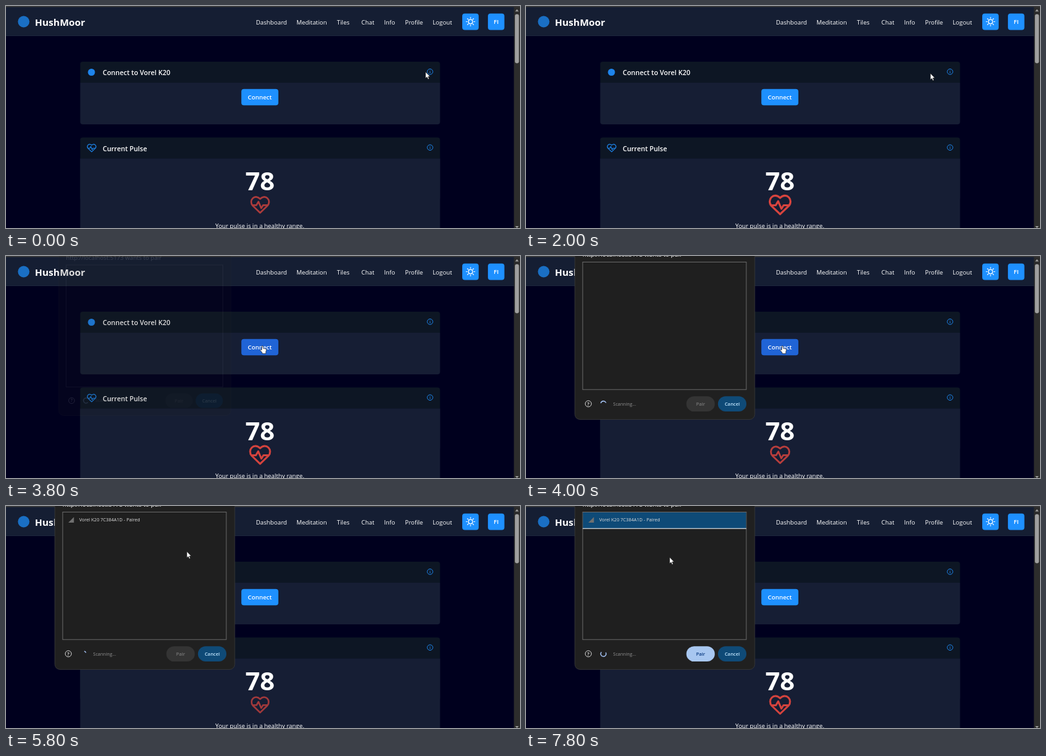
These frames come from a looping animation (800 px wide and 347 px high, 8 s). An HTML page:

```html
<!DOCTYPE html>
<html lang="en">
<head>
<meta charset="utf-8">
<title>Pulse dashboard</title>
<style>
  html, body { margin: 0; width: 100%; height: 100%; overflow: hidden; background: #00001e; }
  svg { display: block; width: 100%; height: 100%; }
  text { font-family: "Open Sans", "Noto Sans", sans-serif; fill: #fff; white-space: pre; }
  .nav { font-size: 9.4px; }
  .title { font-size: 10.5px; font-weight: 600; }
  .button { font-size: 9.4px; font-weight: 600; text-anchor: middle; }
  .small { font-size: 7.1px; }
  .pill { font-size: 7.4px; font-weight: 600; text-anchor: middle; }
  .line { fill: none; stroke: #1e84ea; }
</style>
</head>
<body>
<svg viewBox="0 0 800 347" preserveAspectRatio="none">
  <defs>
    <g id="heart" fill="none" stroke-width="1.8" stroke-linejoin="round" stroke-linecap="round">
      <path d="M0 9L-8 1.3C-12.6-4-6-12 0-6C6-12 12.6-4 8 1.3Z"/>
      <path d="M-8 .8H-4L-1.8-3L1.2 4L3.2 .8H8"/>
    </g>
    <g id="info" class="line">
      <circle r="4.3"/>
      <path d="M0-.5V2.3M0-2.3V-1.4"/>
    </g>
    <g id="card">
      <path fill="#161e34" d="M0 33H560V94a4 4 0 0 1-4 4H4a4 4 0 0 1-4-4Z"/>
      <path fill="#0d1624" d="M0 33V4a4 4 0 0 1 4-4H556a4 4 0 0 1 4 4V33Z"/>
    </g>
  </defs>

  <rect width="800" height="347" fill="#00001e"/>
  <rect width="791" height="46.5" fill="#151e33"/>
  <path stroke="#1c263b" d="M0 46.5H791"/>
  <circle cx="27.5" cy="24.5" r="9" fill="#1a6fc4"/>
  <text x="45" y="30.5" font-size="15" font-weight="700">HushMoor</text>
  <g id="menu"></g>
  <g fill="#1e90ff">
    <rect x="710.1" y="11.8" width="25.6" height="25.6" rx="4"/>
    <rect x="750.1" y="11.8" width="25.6" height="25.6" rx="4"/>
  </g>
  <g transform="translate(723 24.5)" fill="none" stroke="#fff" stroke-width="1.2">
    <circle r="3.3"/>
    <path id="rays" stroke-linecap="round"/>
  </g>
  <text class="button" x="763" y="28">FI</text>

  <use href="#card" x="115.5" y="87"/>
  <circle cx="133" cy="103.5" r="5.5" fill="#1e84ea"/>
  <text class="title" x="150.5" y="108">Connect to Vorel K20</text>
  <use href="#info" x="660" y="102.7"/>
  <rect id="connect" x="366.3" y="129.7" width="57.6" height="25.5" rx="4"/>
  <text class="button" x="395" y="146.3">Connect</text>

  <use href="#card" x="115.5" y="205.5"/>
  <rect x="115.5" y="238.5" width="560" height="109" fill="#161e34"/>
  <use href="#heart" stroke="#1e84ea" transform="translate(133.3 221.7) scale(.69)"/>
  <text class="title" x="150.5" y="226.5">Current Pulse</text>
  <use href="#info" x="660" y="221.2"/>
  <text x="395.3" y="288.3" font-size="40" font-weight="700" text-anchor="middle">78</text>
  <use id="pulse" href="#heart" stroke="#d8443e"/>
  <text class="nav" x="395" y="347" text-anchor="middle">Your pulse is in a healthy range.</text>

  <g id="tooltip">
    <rect x="505" y="116" width="160" height="30.5" rx="4" fill="#1b2630"/>
    <text class="small" x="510" y="129">Click "Connect", select your device, press</text>
    <text class="small" x="510" y="139">"Pair" and wait while it connects.</text>
  </g>

  <rect x="790.5" width="9.5" height="347" fill="#2c2c2c"/>
  <rect x="792.1" y="12.7" width="6.3" height="76.8" rx="3" fill="#9f9f9f"/>
  <path fill="#9f9f9f" d="M792.5 8.5L795.3 5L798 8.5ZM792.5 344L795.3 347L798 344Z"/>
  <rect width="800" height="1.6" fill="#3b3b3b"/>

  <g id="dialog">
    <rect x="76" y="-20" width="280" height="275.5" rx="8" fill="#202020" stroke="#3a3a3a" stroke-width=".8"/>
    <text x="88" y="1" font-size="9.7" fill="#e3e3e3">http://localhost:5173 wants to pair</text>
    <rect x="88.2" y="9.5" width="254.7" height="199.3" fill="#1f1f1f" stroke="#707070" stroke-width=".9"/>
    <g id="device">
      <g id="selection">
        <rect x="88.7" y="10" width="253.8" height="25" fill="#0e4a77"/>
        <rect x="88.2" y="34.7" width="254.7" height="1" fill="#fff"/>
      </g>
      <path fill="#707070" d="M97 26H105.7V17.3Z"/>
      <text class="small" x="114" y="24.3" style="fill:#dcdcdc">Vorel K20 7C384A1D - Paired</text>
    </g>
    <circle cx="97" cy="231" r="4.8" fill="none" stroke="#d0d0d0"/>
    <text class="pill" x="97" y="233.6">?</text>
    <path id="spinner" fill="none" stroke="#a8c7fa" stroke-width="1.4" stroke-linecap="round"/>
    <text class="small" x="135.5" y="233.5" style="fill:#8f8f8f">Scanning...</text>
    <rect id="pairBox" x="249.6" y="219.2" width="44.2" height="23.9" rx="11.95"/>
    <text id="pairLabel" class="pill" x="271.7" y="233.8">Pair</text>
    <rect x="298.8" y="219.2" width="44.2" height="23.9" rx="11.95" fill="#0f4a77"/>
    <text class="pill" x="321" y="233.8" style="fill:#c2e7ff">Cancel</text>
  </g>

  <g id="cursor" fill="#fff" stroke="#111" stroke-width=".6" stroke-linejoin="round">
    <path id="arrow" d="M0 0V10L2.3 7.9L3.9 11.5L5.5 10.8L4 7.3H7Z"/>
    <path id="hand" d="M-1 .9Q0-.6 1 .9V4.2L5.4 5.2Q6.4 5.6 6.2 7L5.3 10.2V12.6H-.2V11L-3.3 7.4Q-3.6 6-2.4 6.1L-1 7.2Z"/>
  </g>
</svg>
<script>
const LOOP = 8000, STEP = 200;
const el = id => document.getElementById(id);
const show = (id, on) => el(id).setAttribute('visibility', on ? 'inherit' : 'hidden');
const set = (id, name, value) => el(id).setAttribute(name, value);

const menu = { Dashboard: 389, Meditation: 452, Tiles: 515, Chat: 553, Info: 588.5, Profile: 621, Logout: 664 };
el('menu').innerHTML = Object.entries(menu)
  .map(([label, x]) => `<text class="nav" x="${x}" y="28.5">${label}</text>`).join('');

const polar = (angle, r) => [Math.cos(angle) * r, Math.sin(angle) * r];
set('rays', 'd', Array.from({ length: 8 }, (_, i) =>
  `M${polar(i * Math.PI / 4, 5.3)}L${polar(i * Math.PI / 4, 6.7)}`).join(''));

// time, x, y of the pointer tip
const track = [
  [0, 653, 103], [200, 653, 103], [400, 658.5, 99], [1800, 658.5, 99], [2600, 542, 124],
  [3400, 399, 140], [5200, 399, 140], [6200, 203, 25], [6800, 203, 25], [LOOP - STEP, 223.5, 80]
];

function pointerAt(t) {
  const i = Math.max(1, track.findIndex(key => key[0] >= t));
  const [t0, x0, y0] = track[i - 1], [t1, x1, y1] = track[i];
  const p = (t - t0) / (t1 - t0);
  return [x0 + (x1 - x0) * p, y0 + (y1 - y0) * p];
}

// The arc grows at its head, then shrinks from its tail, while it turns.
function spinnerPath(t) {
  const elapsed = t - 6800, sweepTime = 2000 / 3;
  const k = Math.floor(elapsed / sweepTime + 1e-6);
  const p = Math.max(0, elapsed / sweepTime - k) ** 3;
  const shrinking = k & 1;
  const sweep = Math.max(8, 270 * (shrinking ? 1 - p : p));
  const tail = 75 + 360 * elapsed / 1568 + 270 * ((k >> 1) + (shrinking ? p : 0));
  const point = deg => {
    const [x, y] = polar(deg * Math.PI / 180, 4.2);
    return `${120.5 + x} ${231 + y}`;
  };
  return `M${point(tail)}A4.2 4.2 0 ${sweep > 180 ? 1 : 0} 1 ${point(tail + sweep)}`;
}

function draw(t) {
  const overInfo = t >= 400 && t <= 1800;
  const overConnect = t >= 3400 && t <= 5200;
  const selected = t >= 6200;

  set('cursor', 'transform', `translate(${pointerAt(t)})`);
  show('hand', overInfo || overConnect);
  show('arrow', !overInfo && !overConnect);
  show('tooltip', overInfo);
  set('connect', 'fill', overConnect ? '#2064d6' : '#1e90ff');

  const beat = (1 + Math.cos(2 * Math.PI * (t / 1500 - .37))) / 2;
  set('pulse', 'transform', `translate(395.5 310.2) scale(${1.4 + .3 * beat})`);
  set('pulse', 'opacity', .72 + .28 * Math.min(1, beat * 1.25));

  const opening = t < 4000;
  show('dialog', t >= 3800);
  set('dialog', 'opacity', opening ? .15 : 1);
  set('dialog', 'transform', opening ? 'translate(216 115) scale(.957) translate(-216 -115)' : '');
  show('device', t >= 4200);
  el('selection').style.display = selected ? '' : 'none';
  set('pairBox', 'fill', selected ? '#a8c7f0' : '#343434');
  el('pairLabel').style.fill = selected ? '#0b3b82' : '#777';
  set('spinner', 'd', spinnerPath(t));
}

function frame() {
  draw(Math.floor(performance.now() % LOOP / STEP) * STEP);
  requestAnimationFrame(frame);
}
frame();
</script>
</body>
</html>
```
